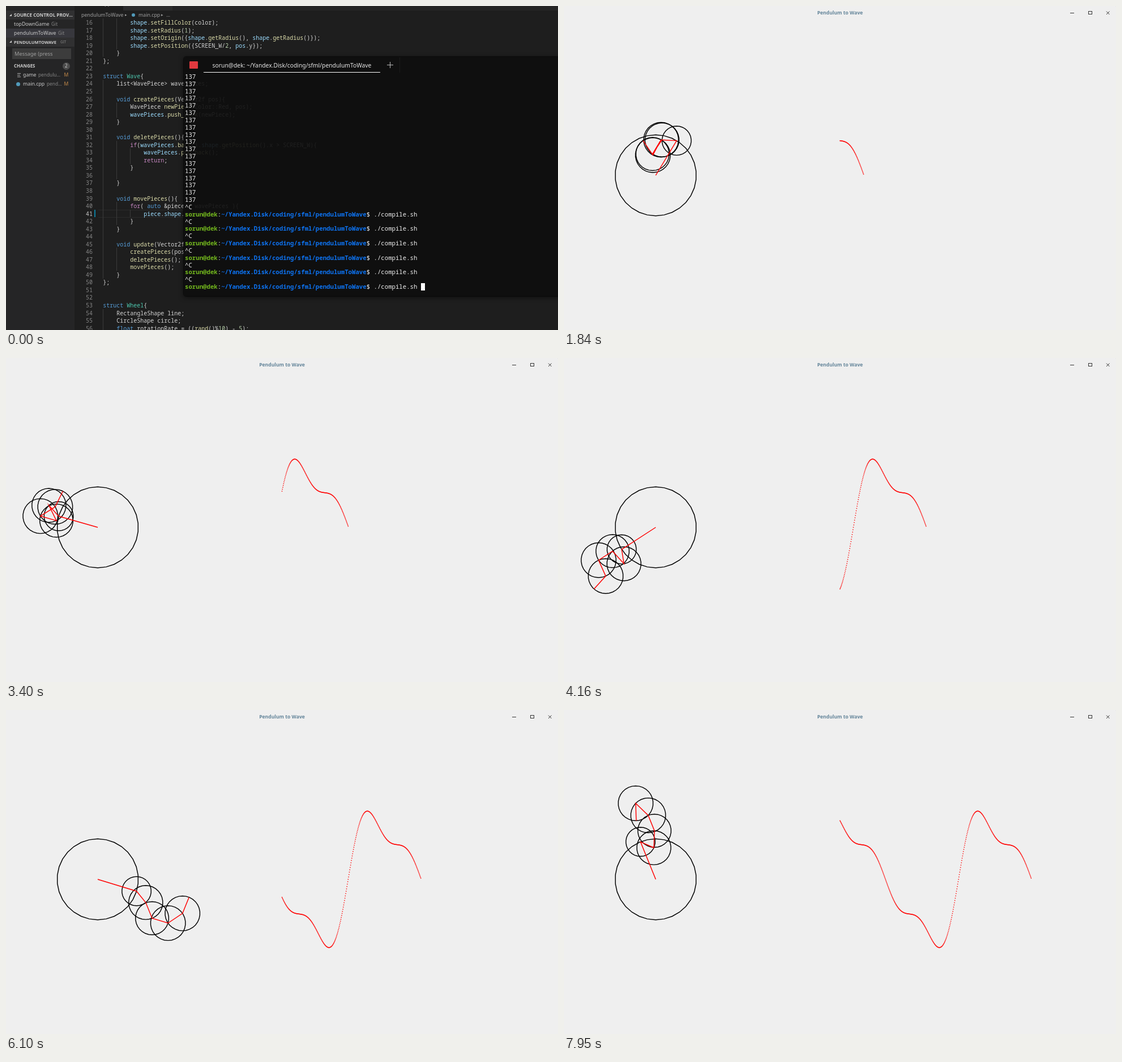
An HTML page with a canvas for the animation above (7.99 s loop, 975 by 574 pixels).

```html
<!DOCTYPE html>
<html lang="en">
<head>
<meta charset="utf-8">
<title>Pendulum to Wave</title>
<style>
html, body { margin: 0; width: 100%; height: 100%; overflow: hidden; background: #1e1e1e; }
#stage { position: relative; width: 975px; height: 574px; overflow: hidden; background: #1e1e1e; }
#stage div, #stage span.t, canvas { position: absolute; }
.t { white-space: pre; line-height: 14px; font-family: "Noto Sans", sans-serif; color: #ccc; }
.code { font-family: "Noto Sans Mono", monospace; color: #d4d4d4; }
.k { color: #569cd6; } .c { color: #c586c0; } .f { color: #dcdcaa; }
.y { color: #4ec9b0; } .n { color: #b5cea8; } .o { color: #9cdcfe; }
.dim { color: #858585; }
#term { left: 314px; top: 90px; width: 670px; height: 424px; border-radius: 4px;
  background: rgba(14,14,14,.91); box-shadow: 0 2px 10px rgba(0,0,0,.6), 0 0 0 1px rgba(0,0,0,.5); }
#term .t.row { color: #f0f0f0; font: 10.69px/12.83px "Noto Sans Mono", monospace; }
.user { color: #72b61d; font-weight: bold; } .path { color: #0d73f2; font-weight: bold; }
#win { left: 0; top: -2px; width: 975px; height: 640px; background: #efefef; border-radius: 3px;
  transform-origin: 487.5px 555px; box-shadow: 0 0 14px rgba(0,0,0,.7); }
#win canvas { left: 0; top: 2px; }
#title { left: 0; width: 975px; top: 7px; text-align: center; font-size: 8.6px; font-weight: bold; color: #64859a; }
</style>
</head>
<body>
<div id="stage">
  <div id="editor"></div>
  <div id="term"></div>
  <div id="win"><canvas id="view" width="975" height="574"></canvas><span class="t" id="title">Pendulum to Wave</span></div>
</div>
<script>
const $ = id => document.getElementById(id);
const editor = $('editor'), term = $('term'), win = $('win');
const LOOP = 7990;

function box(parent, x, y, w, h, color, extra = '') {
  const el = document.createElement('div');
  el.style.cssText = `left:${x}px;top:${y}px;width:${w}px;height:${h}px;background:${color};${extra}`;
  parent.append(el);
  return el;
}

// y is the vertical centre of the line
function text(parent, x, y, size, html, cls = '', extra = '') {
  const el = document.createElement('span');
  el.className = 't ' + cls;
  el.style.cssText = `left:${x}px;top:${y - 7}px;font-size:${size}px;${extra}`;
  el.innerHTML = html;
  parent.append(el);
  return el;
}

/* ---------- code editor ---------- */
const source = `        shape.setFillColor(color);
        shape.setRadius(1);
        shape.setOrigin({shape.getRadius(), shape.getRadius()});
        shape.setPosition({SCREEN_W/2, pos.y});
    }
};

struct Wave{
    list<WavePiece> wavePieces;

    void createPieces(Vector2f pos){
        WavePiece newPiece(Color::Red, pos);
        wavePieces.push_back(newPiece);
    }

    void deletePieces(){
        if(wavePieces.back().shape.getPosition().x > SCREEN_W){
            wavePieces.pop_back();
            return;
        }

    }

    void movePieces(){
        for( auto &piece : wavePieces ){
            piece.shape.move(1,0);
        }
    }

    void update(Vector2f pos){
        createPieces(pos);
        deletePieces();
        movePieces();
    }
};


struct Wheel{
    RectangleShape line;
    CircleShape circle;
    float rotationRate = ((rand()%10) - 5);`.split('\n');

const escapeHtml = s => s.replace(/&/g, '&amp;').replace(/</g, '&lt;').replace(/>/g, '&gt;');
const span = (cls, s) => `<span class="${cls}">${s}</span>`;

function highlight(line) {
  const token = /(\b(?:struct|void|auto|float)\b)|(\b(?:if|for|return)\b)|(\b[a-z]\w*(?=\())|(\b(?:Wave|Wheel)(?=\{))|(\b\d+\b)|(\b[a-z]\w*(?=\.))|([^\w]|\w+)/g;
  return line.replace(token, (m, k, c, f, y, n, o) =>
    k ? span('k', m) : c ? span('c', m) : f ? span('f', m) : y ? span('y', m) :
    n ? span('n', m) : o ? span('o', m) : escapeHtml(m));
}

function buildEditor() {
  const charW = 6, lineH = 13.535, firstLine = 16, uiSize = 8.8, crumb = 'color:#a0a0a0';
  box(editor, 121, 0, 854, 8, '#252526');
  box(editor, 121, 0, 86, 8, '#1e1e1e');
  box(editor, 207, 0, 87, 8, '#2d2d2d');
  text(editor, 145, -4, 9.3, 'main.cpp');

  text(editor, 133, 16, uiSize, 'pendulumToWave', '', crumb);
  text(editor, 210, 16, 7, '▸', '', crumb);
  box(editor, 222, 13, 6, 6, '#519aba', 'border-radius:50%');
  text(editor, 234, 16, uiSize, 'main.cpp', '', crumb);
  text(editor, 274, 16, 7, '▸', '', crumb);
  text(editor, 283, 16, uiSize, '…', '', crumb);

  box(editor, 163, 361, 151, 12, 'transparent', 'border:solid #2b2b2b;border-width:1px 0');
  box(editor, 156, 361, 2, 13, '#0c7d9d');

  const indentOf = s => s.search(/\S/) / 4;
  source.forEach((line, i) => {
    const y = 29.2 + i * lineH, num = firstLine + i;
    let depth = indentOf(line);
    if (depth < 0) {
      const next = source.slice(i).find(s => s) || '';
      depth = Math.max(0, indentOf(next) + (next.trim() === '}' ? 1 : 0));
    }
    for (let d = 0; d < depth; d++) box(editor, 171 + d * 4 * charW, y - 6.8, 1, lineH, '#3a3a3a');
    text(editor, 122, y, 10, num, 'code', `width:31px;text-align:right;color:${num === 41 ? '#c6c6c6' : '#858585'}`);
    text(editor, 171.2, y, 10, highlight(line), 'code');
  });

  // source control panel
  box(editor, 0, 0, 121, 574, '#252526');
  box(editor, 0, 8, 121, 16, '#303031');
  box(editor, 0, 40, 121, 15.5, '#37373d');
  box(editor, 0, 56, 121, 15.5, '#303031');
  const arrow = 'clip-path:polygon(100% 0,100% 100%,0 100%)';
  box(editor, 6, 14, 4, 4, '#ccc', arrow);
  box(editor, 6, 61, 4, 4, '#ccc', arrow);
  text(editor, 14, 16, 8.1, 'SOURCE CONTROL PROV…', '', 'font-weight:bold');
  text(editor, 14, 32, uiSize, 'topDownGame');
  text(editor, 80, 32, 8.3, 'Git', 'dim');
  text(editor, 14, 48, uiSize, 'pendulumToWave');
  text(editor, 92, 48, 8.3, 'Git', 'dim');
  text(editor, 14, 63.5, 7.6, 'PENDULUMTOWAVE', '', 'font-weight:bold');
  text(editor, 96, 63.5, 6.4, 'GIT', 'dim');
  box(editor, 11, 75, 104, 19, '#3c3c3c');
  text(editor, 15, 84.5, 9.3, 'Message (press', '', crumb);
  text(editor, 14, 106, 7.9, 'CHANGES', '', 'font-weight:bold');
  box(editor, 100, 99.5, 13, 13, '#4d4d4d', 'border-radius:50%');
  text(editor, 104, 106, 8.2, '2');
  [0, 3, 6].forEach((dy, i) => box(editor, 20, 118.5 + dy, i === 1 ? 5 : 6, 1, '#b0b0b0'));
  text(editor, 30, 122, uiSize, 'game');
  text(editor, 57, 122, 8.3, 'pendulu…', 'dim');
  box(editor, 18, 134.5, 7, 7, '#519aba', 'border-radius:50%');
  text(editor, 30, 138, uiSize, 'main.cpp');
  text(editor, 72, 138, 8.3, 'pend…', 'dim');
  [122, 138].forEach(y => text(editor, 102.5, y, 8.6, 'M', '', 'color:#c58a4a'));
}

/* ---------- terminal ---------- */
const USER = 'sorun@dek', PATH = '~/Yandex.Disk/coding/sfml/pendulumToWave';
const rowH = 12.83, rowCount = 30;
let rows, cursor;

function buildTerminal() {
  box(term, 10, 8, 15, 13, '#e0393f', 'border-radius:1px');
  text(term, 35, 14.5, 10.3, `${USER}: ${PATH}`, '', 'width:312px;text-align:center;color:#e6e6e6');
  box(term, 35, 27, 312, 1, '#fff');
  box(term, 359, 14, 11, 1, '#bbb');
  box(term, 364, 9, 1, 11, '#bbb');
  box(term, 381, 1, 1, 27, '#1b1b1b');
  rows = Array.from({ length: rowCount }, (_, i) =>
    text(term, 2, 36 + i * rowH, 10.69, '', 'row'));
  cursor = box(term, 2, 401, 6.6, 13, '#fff');
}

const prompt = span('user', USER) + ':' + span('path', PATH) + '$ ./compile.sh';
const history = [...Array(18).fill('137'), ...Array(6).fill(['^C', prompt]).flat(), ''];
let shownScroll = -1;

function drawTerminal(t) {
  const scroll = t < 310 ? 0 : 1;
  if (scroll !== shownScroll) {
    rows.forEach((row, i) => row.innerHTML = history[i + scroll]);
    cursor.style.left = (scroll ? 1.4 : 419) + 'px';
    shownScroll = scroll;
  }
  cursor.style.visibility = t < 840 ? 'visible' : 'hidden';
}

/* ---------- pendulum window ---------- */
const ctx = $('view').getContext('2d');
const SCALE = 975 / 1360, RAD = Math.PI / 180;
const center = { x: 162, y: 300 };
const wheels = [[100, 1], [36, 3], [42, 4], [41, 1], [43, -2], [43, -4]]
  .map(([r, rate]) => ({ r: r * SCALE, rate }));

// time in ms, degrees turned by the first wheel
const pace = [[990, 1], [1180, 14], [2610, 111], [3400, 164.3], [4160, 213], [5010, 271.5],
  [5820, 323], [6100, 343], [6640, 380], [7250, 423], [7450, 437.5], [7950, 472], [7990, 474.8]];

function stepsAt(t) {
  const i = Math.max(1, pace.findIndex(p => p[0] > t));
  const [t0, n0] = pace[i - 1], [t1, n1] = pace[i];
  return Math.round(n0 + (n1 - n0) * (t - t0) / (t1 - t0));
}

function joints(n) {
  let { x, y } = center;
  return [{ x, y }, ...wheels.map(({ r, rate }) => {
    x += r * Math.cos(n * rate * RAD);
    y -= r * Math.sin(n * rate * RAD);
    return { x, y };
  })];
}

// wheels are 30-sided, with one corner at the top
function ring({ x, y }, r) {
  ctx.beginPath();
  for (let i = 0; i < 30; i++) {
    const a = (i * 12 - 90) * RAD;
    ctx.lineTo(x + r * Math.cos(a), y + r * Math.sin(a));
  }
  ctx.closePath();
  ctx.stroke();
}

function stroke(points) {
  ctx.beginPath();
  points.forEach(p => ctx.lineTo(p.x, p.y));
  ctx.stroke();
}

function drawButtons() {
  ctx.strokeStyle = '#333';
  ctx.lineWidth = 1;
  stroke([{ x: 894, y: 12.5 }, { x: 901, y: 12.5 }]);
  ctx.strokeRect(926.5, 9.5, 6, 5);
  stroke([{ x: 958, y: 9.5 }, { x: 963.5, y: 15 }]);
  stroke([{ x: 963.5, y: 9.5 }, { x: 958, y: 15 }]);
}

function drawPendulum(n) {
  ctx.clearRect(0, 0, 975, 574);
  drawButtons();
  const points = joints(n);
  ctx.lineWidth = 1.45;
  ctx.strokeStyle = '#000';
  wheels.forEach((w, i) => ring(points[i], w.r));
  ctx.strokeStyle = ctx.fillStyle = '#f00';
  stroke(points);
  const dot = 2 * SCALE;
  for (let k = 1; k <= n; k++) {
    const x = 487.5 + (n - k) * SCALE, y = joints(k)[6].y;
    ctx.fillRect(x - dot / 2, y - dot / 2, dot, dot);
  }
}

function drawWindow(t) {
  win.style.visibility = t < 990 ? 'hidden' : 'visible';
  if (t < 990) return;
  const p = Math.min(1, (t - 990) / 300);
  win.style.transform = p < 1 ? `scale(${1 - 0.33 * (1 - p) ** 3})` : 'none';
  win.style.opacity = Math.min(1, 0.1 + p * 1.6);
  drawPendulum(stepsAt(t));
}

buildEditor();
buildTerminal();
const start = performance.now();

function frame() {
  const t = (performance.now() - start) % LOOP;
  drawTerminal(t);
  drawWindow(t);
  requestAnimationFrame(frame);
}
frame();
</script>
</body>
</html>
```
